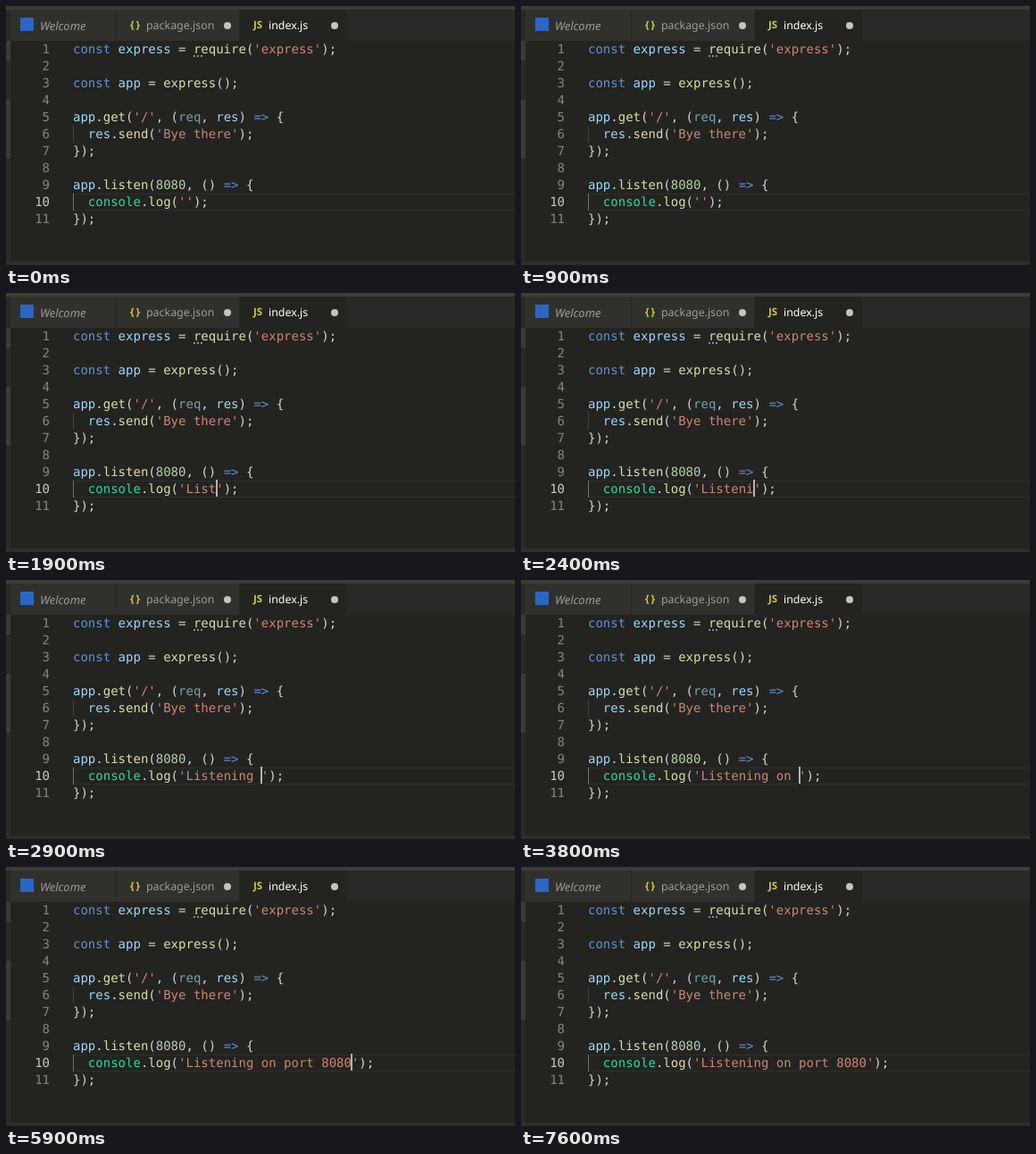
An HTML page that plays this animation: 570 by 290 pixels, repeating every 7.7 s.

```html
<!DOCTYPE html>
<html lang="en">
<head>
<meta charset="utf-8">
<title>Typing in the editor</title>
<style>
html, body { margin: 0; width: 100%; height: 100%; overflow: hidden; background: #232320; }
#stage { position: relative; width: 570px; height: 290px; overflow: hidden; background: #232320; text-rendering: geometricPrecision; }
#stage > div, #stage > pre { position: absolute; }

.top { left: 0; top: 0; width: 570px; height: 4px; background: #3c3d36; }
.side { left: 0; top: 4px; width: 5px; height: 286px; background: #292927; }
.mark { left: 0; width: 5px; background: #3b3b39; }
.foot { left: 0; top: 286px; width: 570px; height: 4px; background: #2d2d2a; }

.tabs { left: 5px; top: 4px; width: 565px; height: 35px; background: #282826; }
.tab { position: absolute; top: 0; height: 35px; background: #30302d; color: #9c9c98; font: 12.4px/36px "Noto Sans", sans-serif; white-space: pre; }
.tab span, .tab b, .tab i { position: absolute; top: 0; }
.tab i { font-size: 12.9px; }
.tab b { color: #c6cc3e; font-size: 11.5px; }
.tab.on { background: #232320; color: #fff; }
.logo { left: 11px; top: 9px; width: 15px; height: 15px; background: #2a66c4; position: absolute; }
.dot { position: absolute; top: 14px; width: 8px; height: 8px; border-radius: 50%; background: #c4c4bf; }

.current { left: 75px; top: 210px; width: 495px; height: 17px; border: solid #2e2e2b; border-width: 1px 0; }
.guide { left: 75px; width: 1px; height: 19px; background: #40403c; }
.guide.on { background: #74746f; }

pre { margin: 0; top: 40px; font: 14px/19px "DejaVu Sans Mono", monospace; color: #d4d4d0; }
.nums { left: 9px; width: 40px; text-align: right; color: #858580; }
.nums b { font-weight: normal; color: #c8c8c4; }
.code { left: 75px; }
.k { color: #5f92d4; }
.v { color: #9cd8fa; }
.u { color: #76a0ac; }
.f { color: #dcdcaa; }
.s { color: #ca8674; }
.n { color: #b5cea8; }
.c { color: #22dca0; }
.hint { left: 210px; top: 55px; width: 10px; height: 2px; background: repeating-linear-gradient(90deg, #8c8c88 0 2px, transparent 2px 4px); }
#caret { position: absolute; width: 2px; height: 19px; margin: -2px 0 0 -.5px; background: #b4b4b0; }
</style>
</head>
<body>
<div id="stage">
  <div class="top"></div>
  <div class="side"></div>
  <div class="mark" style="top:39px;height:22px"></div>
  <div class="mark" style="top:105px;height:66px"></div>
  <div class="tabs">
    <div class="tab" style="left:0;width:118px"><div class="logo"></div><i style="left:33px">Welcome</i></div>
    <div class="tab" style="left:119px;width:137px"><b style="left:15px;letter-spacing:2px">{}</b><span style="left:33px">package.json</span><div class="dot" style="left:120px"></div></div>
    <div class="tab on" style="left:257px;width:120px"><b style="left:15px">JS</b><span style="left:32px">index.js</span><div class="dot" style="left:102px"></div></div>
  </div>
  <div class="current"></div>
  <div class="guide" style="top:134px"></div>
  <div class="guide on" style="top:210px"></div>
  <pre class="nums">1
2
3
4
5
6
7
8
9
<b>10</b>
11</pre>
  <pre class="code"><span class="k">const</span> <span class="v">express</span> = <span class="f">require</span>(<span class="s">'express'</span>);

<span class="k">const</span> <span class="v">app</span> = <span class="f">express</span>();

<span class="v">app</span>.<span class="f">get</span>(<span class="s">'/'</span>, (<span class="u">req</span>, <span class="v">res</span>) <span class="k">=&gt;</span> {
  <span class="v">res</span>.<span class="f">send</span>(<span class="s">'Bye there'</span>);
});

<span class="v">app</span>.<span class="f">listen</span>(<span class="n">8080</span>, () <span class="k">=&gt;</span> {
  <span class="c">console</span>.<span class="f">log</span>(<span class="s">'<span id="typed"></span><span id="caret"></span>'</span>);
});</pre>
  <div class="hint"></div>
  <div class="foot"></div>
</div>
<script>
const LOOP = 7700;
const BLINK = 500;
const MESSAGE = 'Listening on port 8080';
// One time per typed character, in ms.
const KEYS = [
  1200, 1500, 1700, 1900, 2100, 2300, 2400, 2600, 2700, 2900,
  3200, 3400, 3600, 4000, 4200, 4400, 4600, 4700,
  5200, 5300, 5500, 5700
];
const FIRST_BLINK = 400;
const typed = document.getElementById('typed');
const caret = document.getElementById('caret');

function draw(now) {
  const t = now % LOOP;
  const count = KEYS.filter(key => key <= t).length;
  // Every key press restarts the blink with the caret visible.
  const since = t - (count ? KEYS[count - 1] : FIRST_BLINK);
  const visible = since >= 0 && Math.floor(since / BLINK) % 2 === 0;
  const text = MESSAGE.slice(0, count);
  if (typed.textContent !== text) typed.textContent = text;
  caret.style.visibility = visible ? 'visible' : 'hidden';
}

const start = performance.now();
function tick() {
  draw(performance.now() - start);
  requestAnimationFrame(tick);
}
tick();
</script>
</body>
</html>
```
